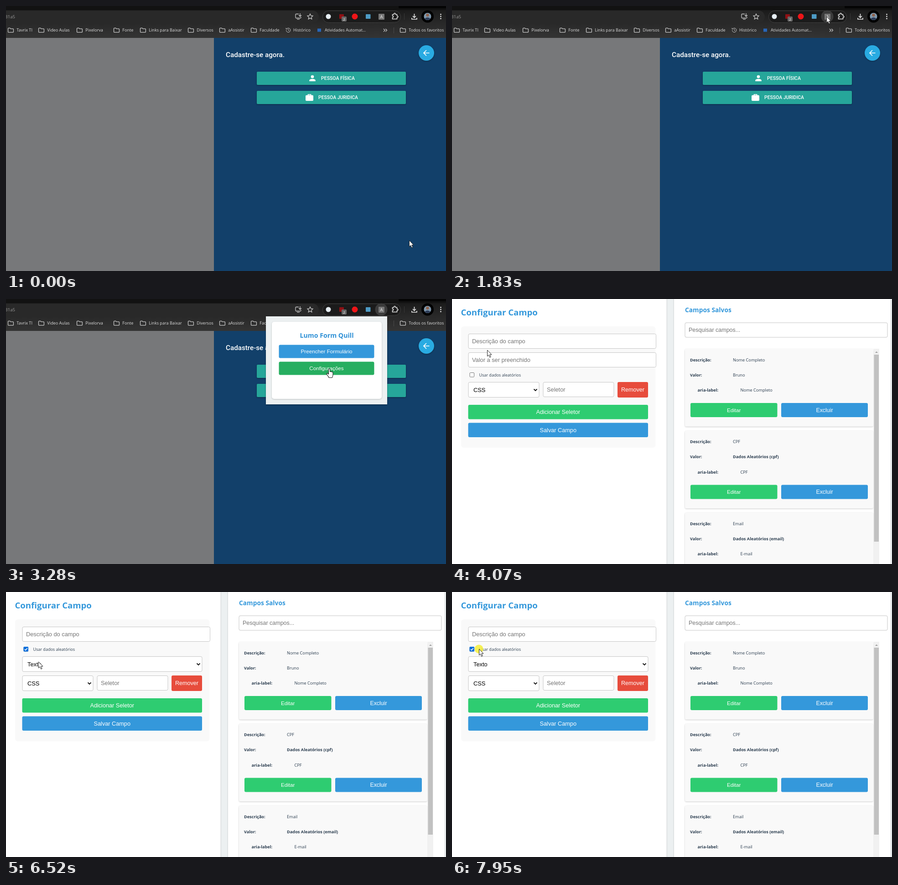
Recreate the animation shown at these times as an HTML page. Size 965 by 581 pixels, loop 8000 ms.

```html
<!DOCTYPE html>
<html lang="pt-BR">
<head>
<meta charset="utf-8">
<title>Preenchimento de formulário</title>
<style>
  html, body { margin: 0; width: 100%; height: 100%; overflow: hidden; background: #fff; }
  svg { display: block; width: 965px; height: 581px; }
  text { font-family: "Open Sans", "Noto Sans", sans-serif; white-space: pre; }
  text.control { font-family: "Liberation Sans", Arial, sans-serif; }
  text.site { font-family: Roboto, sans-serif; font-weight: 500; }
  .line { fill: none; stroke: #c9c9c9; stroke-width: 1.3; }
  .raised { filter: drop-shadow(0 1px 1.6px rgba(0, 0, 0, .36)); }
  .card { filter: drop-shadow(0 1px 1.5px rgba(0, 0, 0, .2)); }
</style>
</head>
<body>
<svg id="stage" viewBox="0 0 965 581"></svg>
<script>
const LOOP = 8000;
const BLUE = '#3498db', GREEN = '#2ecc71', RED = '#e74c3c', INK = '#2c3e50', GRAY = '#757575';

const rect = (x, y, w, h, fill, r = 0, attrs = '') =>
  `<rect x="${x}" y="${y}" width="${w}" height="${h}" rx="${r}" fill="${fill}" ${attrs}/>`;
const circle = (x, y, r, fill, attrs = '') => `<circle cx="${x}" cy="${y}" r="${r}" fill="${fill}" ${attrs}/>`;
const path = (d, attrs = 'class="line"') => `<path d="${d}" ${attrs}/>`;
const text = (x, y, label, size, fill, attrs = '') =>
  `<text x="${x}" y="${y}" font-size="${size}" fill="${fill}" ${attrs}>${label}</text>`;
const group = (id, content, attrs = '') => `<g id="${id}" ${attrs}>${content}</g>`;

const BOLD = 'font-weight="700"', MIDDLE = 'text-anchor="middle"', CONTROL = 'class="control"';
const button = (x, y, w, h, fill, label, size = 12.6, id = '') =>
  rect(x, y, w, h, fill, 3, id && `id="${id}"`) +
  text(x + w / 2, y + h / 2 + 4.3, label, size, '#fff', `${CONTROL} ${MIDDLE}`);
const box = (x, y, w, h) => rect(x + .5, y + .5, w - 1, h - 1, '#fff', 3, 'stroke="#c6c6c6"');
const input = (x, y, w, label, size = 12.8) =>
  box(x, y, w, 33) + text(x + 8.5, y + 20.5, label, size, GRAY, CONTROL);
const select = (x, y, w, label) => box(x, y, w, 34) +
  text(x + 11.5, y + 21.5, label, 12.8, '#000', CONTROL) +
  path(`M${x + w - 12} ${y + 15.5}l3.5 3.5 3.5-3.5`, 'fill="none" stroke="#111" stroke-width="1.8"');

function browserBar() {
  const folder = x => path(`M${x + .5} 49.5q0-1.2 1.2-1.2h3l1.5 1.5h5q1.2 0 1.2 1.2v5.5q0 1.2-1.2 1.2h-9.5q-1.2 0-1.2-1.2z`);
  const folders = [
    [4, 'Tavrix TI'], [71, 'Video Aulas'], [155, 'Pixelorva'], [236, 'Fonte'], [294, 'Links para Baixar'],
    [399, 'Diversos'], [468, 'aAssistir'], [537, 'Faculdade'], [864, 'Todos os favoritos']
  ];
  const label = (x, name) => text(x, 56.3, name, 9.1, '#dedede');
  return rect(0, 0, 965, 70, 'url(#bar)') + rect(0, 0, 965, 9, '#121212') + rect(861, 0, 104, 5, '#050505') +
    rect(-30, 10, 716, 27, '#292929', 13.5) +
    text(20, 27, '31a5', 9.6, '#9b9b9b', 'text-anchor="end"') +
    path('M642 17.5h-5.5q-1.5 0-1.5 1.5v6q0 1.5 1.5 1.5h9q1.5 0 1.5-1.5v-1M638 29.2h6M645 16v6.5M642 20l3 3 3-3') +
    path('M667 17.2l1.8 3.9 4.2.5-3.1 2.9.8 4.2-3.7-2.1-3.7 2.1.8-4.2-3.1-2.9 4.2-.5z') +
    rect(694.5, 10.5, 171, 26, '#1b1b1b', 13, 'stroke="#414141"') +
    circle(707, 23, 5.5, '#e6eef5') +
    rect(731, 18, 10, 10, '#8e1014', 1) + rect(736, 23, 11, 11, '#686868', 2) +
    text(741.5, 31.8, '2', 8, '#fff', MIDDLE) +
    circle(765, 23, 6.5, '#ee1518') + rect(789, 18, 10.5, 10, '#4d9ac4', 1) +
    circle(823, 23, 13.5, '#3b3b3b', 'id="extensionHover"') +
    rect(817, 17, 13, 13, '#777', 1) + text(823.5, 27, 'A', 9.5, '#eee', MIDDLE) +
    path('M847.5 18.5h3.2q-.3-2.8 1.8-2.8t1.8 2.8h3.2v3.2q2.3-.2 2.3 1.8t-2.3 1.8v3.2h-10v-3.3q2.2 0 2.2-1.7t-2.2-1.7z',
      'fill="none" stroke="#e2e2e2" stroke-width="1.5"') +
    rect(873, 16, 1, 14, '#393939') +
    path('M895.5 17v8M892 22l3.5 3.5 3.5-3.5M890 26v3h11v-3', 'fill="none" stroke="#e2e2e2" stroke-width="1.7"') +
    circle(924.5, 23, 13.5, '#000') + circle(924.5, 23, 8, '#7f98ad') +
    path('M918 27.5q6.5-5 13 0q-6.5 7-13 0z', 'fill="#2c3c58"') + circle(924.5, 20, 3.3, '#8f634d') +
    [18.3, 23, 27.7].map(y => circle(953.5, y, 1.4, '#e2e2e2')).join('') +
    folders.map(([x, name]) => folder(x) + label(x + 19.3, name)).join('') +
    path('M614.5 53a4.6 4.6 0 1 0 1.6-3.5M614.2 48v2.6h2.6M619.2 50.3v3l2 1.2', 'class="line" style="stroke-width:1"') +
    label(630, 'Histórico') + rect(683, 49.5, 8, 7, '#2866b8') + label(699, 'Atividades Automat...') +
    path('M828 50l3.2 3.2-3.2 3.2M832.3 50l3.2 3.2-3.2 3.2') + rect(850, 47, 1, 13, '#4b4b4b');
}

function signupPage() {
  return rect(0, 70, 456, 511, '#77787a') + rect(456, 70, 509, 511, '#12406a') +
    text(482, 112, 'Cadastre-se agora.', 15.2, '#fff', 'class="site"') +
    circle(922, 103, 17, '#29abe2', 'class="raised"') +
    path('M928.5 103h-12M922 97l-6 6 6 6', 'fill="none" stroke="#fff" stroke-width="1.7"') +
    rect(550, 144, 327, 29, '#26a69a', 2, 'class="raised"') +
    circle(672, 155, 3.3, '#fff') + path('M665.3 165v-1.8q0-3.5 6.7-3.5t6.7 3.5v1.8z', 'fill="#fff"') +
    text(691, 162, 'PESSOA FÍSICA', 10.5, '#fff', 'class="site"') +
    rect(550, 186, 327, 29, '#26a69a', 2, 'class="raised"') +
    rect(657, 195.5, 17, 12.5, '#fff', 2) +
    path('M662.5 196v-2h6v2', 'fill="none" stroke="#fff" stroke-width="1.6"') +
    text(685, 204, 'PESSOA JURIDICA', 10.4, '#fff', 'class="site"');
}

function popup() {
  return rect(570, 38, 266, 193, '#ecf0f1', 0, 'class="raised"') +
    rect(583, 50, 241, 169, '#fff', 5, 'class="card"') +
    text(703.5, 84.5, 'Lumo Form Quill', 14.2, '#2e90d6', `${BOLD} ${MIDDLE}`) +
    button(598.5, 100.5, 209, 29, BLUE, 'Preencher Formulário', 11.7, 'fillButton') +
    button(598.5, 137.5, 209, 29, GREEN, 'Configurações', 11.7, 'settingsButton');
}

function savedField(y, description, value, selector, random) {
  const row = (x, dy, name, content, attrs = '') =>
    text(x, y + dy, name, 9.1, INK, BOLD) + text(x + 94, y + dy, content, 9.2, INK, attrs);
  return rect(511, y, 413, 170, '#f9f9f9', 3, 'class="card"') +
    row(522, 27, 'Descrição:', description) +
    row(522, 60.3, 'Valor:', value, random ? BOLD : '') +
    row(538.5, 93.5, 'aria-label:', selector) +
    button(523, y + 118.5, 190.5, 31, GREEN, 'Editar', 11.6) +
    button(722, y + 118.5, 190, 31, BLUE, 'Excluir', 12.4);
}

const OPTIONS = ['Texto', 'CPF', 'CNPJ', 'E-mail', 'Telefone', 'Data'];
const ROW = 21.7, MENU_TOP = 176;

function settingsPage() {
  const menu = rect(36.5, 175.5, 393, 131, '#fff', 4) +
    rect(36.5, MENU_TOP, 393, ROW, '#1967d2', 2, 'id="highlight"') +
    OPTIONS.map((name, i) => text(47.5, MENU_TOP + 15 + i * ROW, name, 12.8, '#111', 'class="control option"')).join('') +
    rect(36.5, 175.5, 393, 131, 'none', 4, 'stroke="#a2a8b0"');
  return rect(0, 0, 965, 581, '#ecf0f1') +
    rect(-5, -5, 475.5, 600, '#fff', 0, 'class="card"') + rect(487, -5, 475, 600, '#fff', 0, 'class="card"') +
    text(19.5, 36.3, 'Configurar Campo', 18.6, BLUE, BOLD) +
    rect(20, 60, 426.5, 266, '#f9f9f9', 6, 'id="panel"') +
    input(35.5, 76, 412.5, 'Descrição do campo') +
    group('valueInput', input(35.5, 117, 412.5, 'Valor a ser preenchido')) +
    group('randomRow',
      rect(39, 161.5, 9.5, 9.5, '#fff', 1.5, 'stroke="#767676"') +
      group('checked', rect(38.5, 161, 10.5, 10.5, '#0b6fdc', 1.5) +
        path('M40.8 166.4l2.1 2.2 4-4.6', 'fill="none" stroke="#fff" stroke-width="1.5"')) +
      text(59.5, 169.6, 'Usar dados aleatórios', 9, INK)) +
    group('typeSelect', select(35.5, 141, 395, 'Texto')) +
    group('lowerForm',
      select(35.5, 182, 156, 'CSS') + input(199.5, 182, 156, 'Seletor') +
      button(363, 182, 67, 34, RED, 'Remover') +
      button(35.5, 232, 394.5, 31.5, GREEN, 'Adicionar Seletor', 12.7) +
      button(35.5, 271.5, 394.5, 31.5, BLUE, 'Salvar Campo', 12.7)) +
    group('menu', menu) +
    text(511, 29, 'Campos Salvos', 13.8, BLUE, BOLD) +
    input(510.5, 51.5, 445, 'Pesquisar campos...', 12.5) +
    savedField(109.5, 'Nome Completo', 'Bruno', 'Nome Completo') +
    savedField(289, 'CPF', 'Dados Aleatórios (cpf)', 'CPF', true) +
    savedField(468.5, 'Email', 'Dados Aleatórios (email)', 'E-mail', true) +
    rect(511, 109, 414, 4, '#f9f9f9') +
    rect(924.5, 109, 12.5, 472, '#f1f1f1') + rect(925.5, 122, 10.5, 410, '#c1c1c1') +
    path('M928 118l3-3 3 3z', 'fill="#9a9a9a"');
}

const CURSORS = {
  arrow: path('M.5 0V13.6l3-2.8 2.3 5.2 2.3-1-2.3-5h4.2z', 'fill="#fff" stroke="#222" stroke-width="1" stroke-linejoin="round"'),
  hand: path('M-1.5 1.5q0-1.5 1.5-1.5t1.5 1.5v5q1.5-1 2.6.2 1.3-.7 2.3.4 1.6-.4 1.6 1.6v4.5q0 3-1.8 6.3h-7q-1.2-3.2-4.6-7.2-1.2-1.8.4-2.4 1.5-.3 3.5 2.1z',
    'fill="#fff" stroke="#222" stroke-width="1.1" stroke-linejoin="round"'),
  beam: path('M-2.5-7h2l.5.5.5-.5h2M0-6.5v13M-2.5 7h2l.5-.5.5.5h2', 'fill="none" stroke="#222" stroke-width="1"')
};

document.getElementById('stage').innerHTML =
  `<defs><linearGradient id="bar" x1="0" y1="0" x2="0" y2="1">
    <stop offset=".13" stop-color="#1b1b1b"/><stop offset=".55" stop-color="#292929"/>
    <stop offset="1" stop-color="#343434"/></linearGradient></defs>` +
  group('signup', browserBar() + signupPage() + group('popup', popup())) +
  group('settings', settingsPage()) +
  circle(0, 0, 9.5, '#f5ee3a', 'id="flash" fill-opacity=".85"') +
  group('cursor', Object.entries(CURSORS).map(([kind, shape]) => group(kind, shape)).join(''));

const el = id => document.getElementById(id);
const show = (id, visible) => { el(id).style.display = visible ? '' : 'none'; };
const moveY = (id, dy) => el(id).setAttribute('transform', `translate(0 ${dy})`);

// Pointer stops: time, x, y
const STOPS = [
  [0, 884, 514], [200, 884, 514], [1000, 880, 168], [1800, 821, 23], [2110, 821, 23], [2440, 738, 100],
  [2740, 709, 138], [3280, 709, 153], [4069, 709, 153], [4070, 77, 112], [4200, 77, 112], [4420, 130, 100],
  [4620, 98, 90], [4800, 52, 104], [5010, 94, 142], [5400, 72, 114], [5840, 42, 165], [6000, 42, 165],
  [6500, 71, 153], [6720, 71, 153], [6940, 72, 243], [7120, 70, 177], [7540, 64, 154], [7750, 59, 125], [LOOP, 59, 125]
];
const CLICKS = [[1960, 2090], [5920, 6000], [6650, 6720], [7950, LOOP]];

function pointerAt(t) {
  const i = STOPS.findIndex(stop => stop[0] > t);
  const [t0, x0, y0] = STOPS[i - 1], [t1, x1, y1] = STOPS[i];
  const k = (t - t0) / (t1 - t0);
  return [x0 + (x1 - x0) * k, y0 + (y1 - y0) * k];
}

function draw(t) {
  const [x, y] = pointerAt(t);
  const between = (a, b) => t >= a && t < b;
  const inY = (a, b) => y >= a && y <= b;
  const onSettings = t >= 4070, popupOpen = between(2110, 4070);
  const random = t >= 5990, menuOpen = between(6650, 7950);

  show('signup', !onSettings);
  show('settings', onSettings);
  show('popup', popupOpen);
  show('extensionHover', t >= 1760);

  const overFill = popupOpen && x < 808 && inY(101, 129);
  const overSettings = popupOpen && inY(137, 167);
  el('fillButton').setAttribute('fill', overFill ? '#2980b9' : BLUE);
  el('settingsButton').setAttribute('fill', overSettings ? '#27ae60' : GREEN);

  show('valueInput', !random);
  show('checked', random);
  show('typeSelect', random);
  show('menu', menuOpen);
  moveY('randomRow', random ? -41 : 0);
  moveY('lowerForm', random ? 1 : 0);
  el('panel').setAttribute('height', random ? 267.5 : 266);

  const active = Math.max(0, Math.floor((y - MENU_TOP) / ROW));
  moveY('highlight', active * ROW);
  document.querySelectorAll('.option').forEach((option, i) =>
    option.setAttribute('fill', i === active ? '#fff' : '#111'));

  const overInput = onSettings && !random && (inY(76, 109) || inY(117, 150));
  const kind = overFill || overSettings ? 'hand' : overInput ? 'beam' : 'arrow';
  Object.keys(CURSORS).forEach(name => show(name, name === kind));
  el('cursor').setAttribute('transform', `translate(${x} ${y})`);
  el('flash').setAttribute('transform', `translate(${x} ${y})`);
  show('flash', CLICKS.some(([from, to]) => between(from, to)));
}

const start = performance.now();
function tick() {
  draw((performance.now() - start) % LOOP);
  requestAnimationFrame(tick);
}
tick();
</script>
</body>
</html>
```
